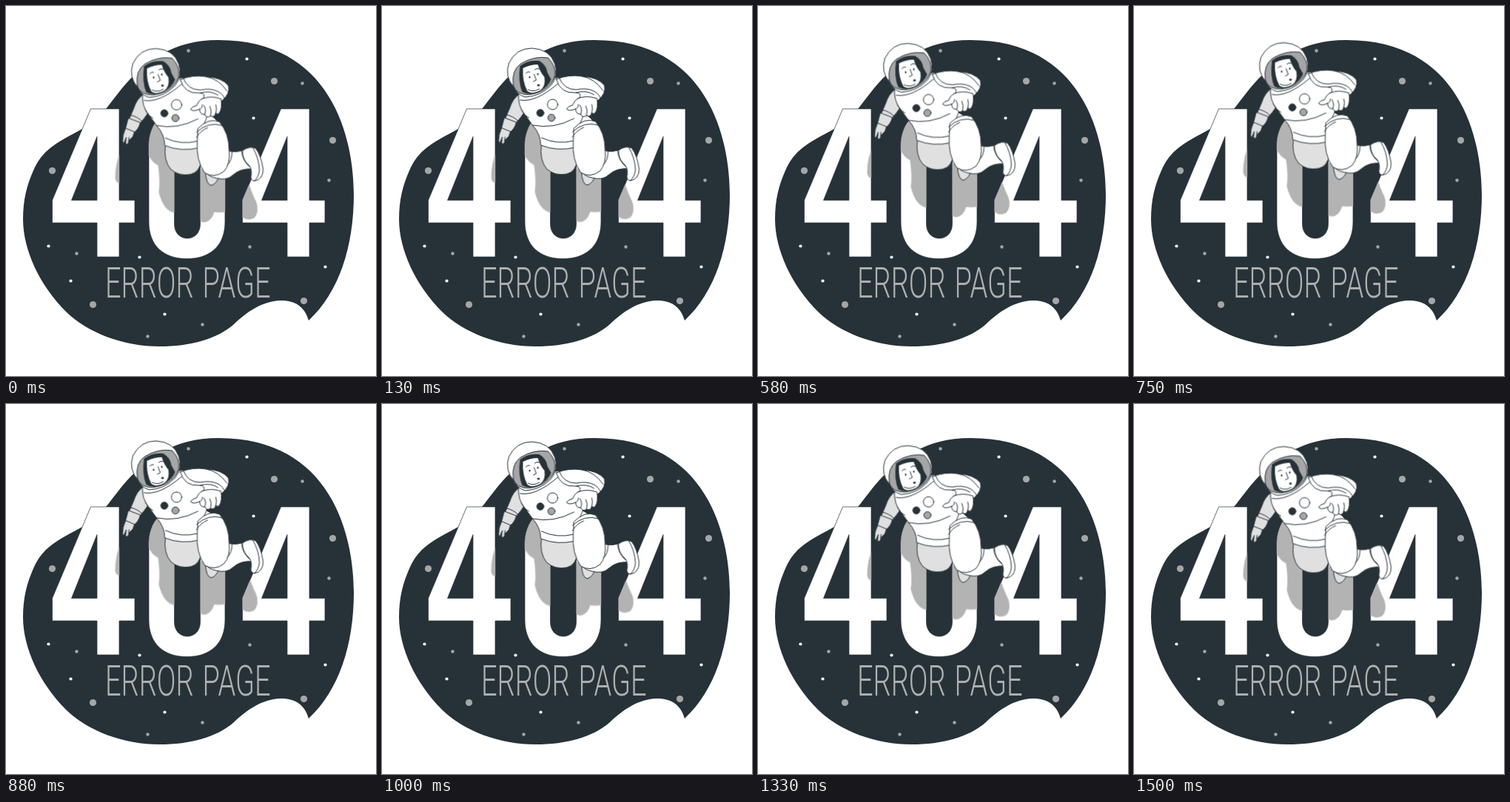
An HTML page for the animation above (1540 ms loop, 500 by 500 pixels).

```html
<!DOCTYPE html>
<html lang="en">
<head>
<meta charset="utf-8">
<title>Error page</title>
<style>
  html, body { margin: 0; width: 100%; height: 100%; overflow: hidden; background: #fff; }
  svg { display: block; width: 100vw; height: 100vh; }
  .ink { fill: #263238; }
  .mid { fill: #a6a6a6; }
  .white { fill: #fff; }
  .line { fill: none; }
  .shade { fill: #e0e0e0; }
  .digit { fill: #fff; stroke: #263238; stroke-width: .7; }
  #suit { stroke: #263238; stroke-width: 1; stroke-linejoin: round; stroke-linecap: round; }
  #suit .bare { stroke: none; }
  #label { font: 300 58px Roboto, sans-serif; word-spacing: 4px; fill: #b0b0b0; }
</style>
</head>
<body>
<svg viewBox="0 0 500 500">
  <defs>
    <path id="four" clip-rule="evenodd" d="M114 138.500H152.500V262H173.500V292.500H152.500V338.500H122.500V292.500H62V262ZM122.500 176L88 262H122.500Z"/>
    <path id="zero" clip-rule="evenodd" d="M192.500 190V291C192.500 323 212 341 244 341S295.500 323 295.500 291V190C295.500 157 276 138 244 138S192.500 157 192.500 190ZM227 186C227 158 262 158 262 186V294C262 320 227 320 227 294Z"/>
    <clipPath id="digits">
      <use href="#four"/>
      <use href="#zero"/>
      <use href="#four" x="257"/>
    </clipPath>
  </defs>

  <path class="ink" d="M409 425C450 387 470 325 470 255C470 178 440 46 287 46C225 46 190 75 163 104C140 130 130 152 105 165C75 182 52 190 38 220C28 242 23 262 23 288C23 330 46 378 81 413C110 442 160 460 207 460C250 460 285 450 308 430C325 414 345 399 371 398C390 398 403 405 409 425Z"/>

  <g transform="translate(.5 .5)">
    <g id="stars"></g>

    <g class="digit" fill-rule="evenodd">
      <use href="#four"/>
      <use href="#zero"/>
      <use href="#four" x="257"/>
    </g>
    <text id="label" transform="translate(133.500 393.500) scale(.655 1)">ERROR PAGE</text>

    <g clip-path="url(#digits)">
      <g class="float" fill="#b3b3b3">
        <path d="M147 231Q147 210 155 194V238Q148 239 147 231Z"/>
        <path d="M190 150H262V218L325 230Q331 250 338 264Q342 277 335 285Q326 290 318 283L310 268Q302 280 281 277Q277 290 267 291Q260 290 250 278H227Q212 275 206 250Q208 235 205 214Q196 210 190 196Z"/>
      </g>
    </g>

    <g id="suit" class="float">
      <!-- legs -->
      <path class="shade" d="M269 223Q270 240 277 241Q285 238 287 229Z"/>
      <path class="shade" d="M215 186Q212 207 222 219Q233 229 249 226Q262 223 264 205L260 186Z"/>
      <path class="white" d="M298 194Q312 198 326 191L334 219Q317 217 306 227Q298 235 283 231Q272 229 267 220Z"/>
      <path class="white" d="M319 194Q329 187 337 191Q344 200 347 219Q347 233 335 235Q329 234 331 226Q332 216 325 211Q319 204 319 194Z"/>
      <path class="line" d="M333 190Q341 203 342 220Q341 230 335 235M318 195Q319 208 329 216"/>

      <!-- left arm -->
      <path class="shade" d="M185 118Q176 124 172 137L166 151L180 158Q187 150 193 141Z"/>
      <path class="shade" d="M165 150L181 156Q179 165 172 170L161 165Z"/>
      <path class="shade" d="M161 164Q157 172 157 181Q158 186 160 181L162 176L161 184Q164 188 166 180L171 175L173 169Z"/>
      <path class="line" d="M168 146Q177 148 183 154M166 176L165 181"/>

      <!-- torso -->
      <path class="white" d="M184 118Q183 134 192 145L203 160Q214 172 214 187Q236 196 261 190L266 160Q276 145 270 112L262 94L234 96Z"/>
      <path class="line" d="M186 126Q207 130 237 104M203 160Q231 166 259 151M215 177Q236 187 259 181M188 139Q191 146 198 150"/>
      <circle class="ink" cx="213.500" cy="143.500" r="4.800"/>
      <circle class="white" cx="230" cy="132" r="7"/>
      <circle class="mid" cx="228.500" cy="150" r="4.800"/>

      <!-- near thigh -->
      <path class="white" d="M259 164Q273 149 288 155Q301 171 301 193Q303 212 294 222Q281 232 268 224Q256 207 258 181Z"/>
      <path class="line" d="M257 169Q273 154 292 160M257 176Q262 167 272 163M299 213Q305 207 305 196"/>

      <!-- right arm -->
      <path class="white" d="M235 98Q252 91 270 94Q291 95 300 106Q303 117 291 127L266 124Q270 116 261 116Q241 118 235 98Z"/>
      <path class="line" d="M239 96Q245 112 262 112Q276 109 286 114Q293 118 295 124M270 94Q287 97 298 113M262 116Q276 112 286 119"/>
      <path class="white" d="M264 124Q276 119 290 124Q292 136 288 143Q285 146 283 143Q281 150 276 147Q271 151 268 145Q262 146 261 138Q252 142 249 138Q251 134 257 133Q259 127 264 124Z"/>
      <path class="line" d="M283 143Q285 137 283 132M276 147Q278 140 275 134M268 145Q271 139 267 133M261 138Q265 137 265 132"/>

      <!-- head -->
      <path class="white" d="M177 108Q165 94 171 76Q181 56 202 56Q226 57 233 77Q238 94 228 106Q214 121 193 122Q182 119 177 108Z"/>
      <path class="mid" d="M177 106Q174 86 187 77Q205 66 224 69Q235 80 233 94Q228 108 213 115Q196 122 185 116Q179 113 177 106Z"/>
      <path class="ink bare" d="M186 80Q198 71 212 73Q222 79 223 89L228 98Q225 107 213 114Q199 121 189 115Q183 101 186 80Z"/>
      <path class="white bare" d="M190 83Q200 78 210 78Q213 88 219 95Q221 108 213 113Q203 119 196 114Q189 101 190 83Z"/>
      <path class="line" d="M194 90Q196 87 199 88M206 85Q209 82 212 84M205 91L208 99L204 101M197 112Q204 116 212 111"/>
      <ellipse class="ink bare" cx="199" cy="95" rx="1" ry="1.500"/>
      <ellipse class="ink bare" cx="210" cy="91" rx="1" ry="1.500"/>
      <ellipse class="ink bare" cx="211" cy="106" rx="1.800" ry="1.500"/>
    </g>
  </g>
</svg>
<script>
  const LOOP = 1540, LOW = 1, HIGH = -7;

  // x, y pairs by colour and radius
  const groups = [
    ['white', 2.1, [325, 71, 334, 151, 57, 324, 87, 371, 214, 416, 180, 339, 431, 352]],
    ['mid', 2.2, [246, 60, 400, 104, 436, 235, 95, 334, 329, 325, 265, 430, 191, 446]],
    ['mid', 4.6, [362, 101, 441, 181, 62, 222, 117, 403, 402, 398]]
  ];
  const stars = document.getElementById('stars');
  for (const [kind, r, spots] of groups) {
    for (let i = 0; i < spots.length; i += 2) {
      const star = document.createElementNS(stars.namespaceURI, 'circle');
      star.setAttribute('class', kind);
      star.setAttribute('cx', spots[i]);
      star.setAttribute('cy', spots[i + 1]);
      star.setAttribute('r', r);
      stars.append(star);
    }
  }

  const bob = [LOW, HIGH, LOW].map(y => ({ transform: `translateY(${y}px)`, easing: 'ease-in-out' }));
  for (const part of document.querySelectorAll('.float')) {
    part.animate(bob, { duration: LOOP, iterations: Infinity });
  }
</script>
</body>
</html>
```
